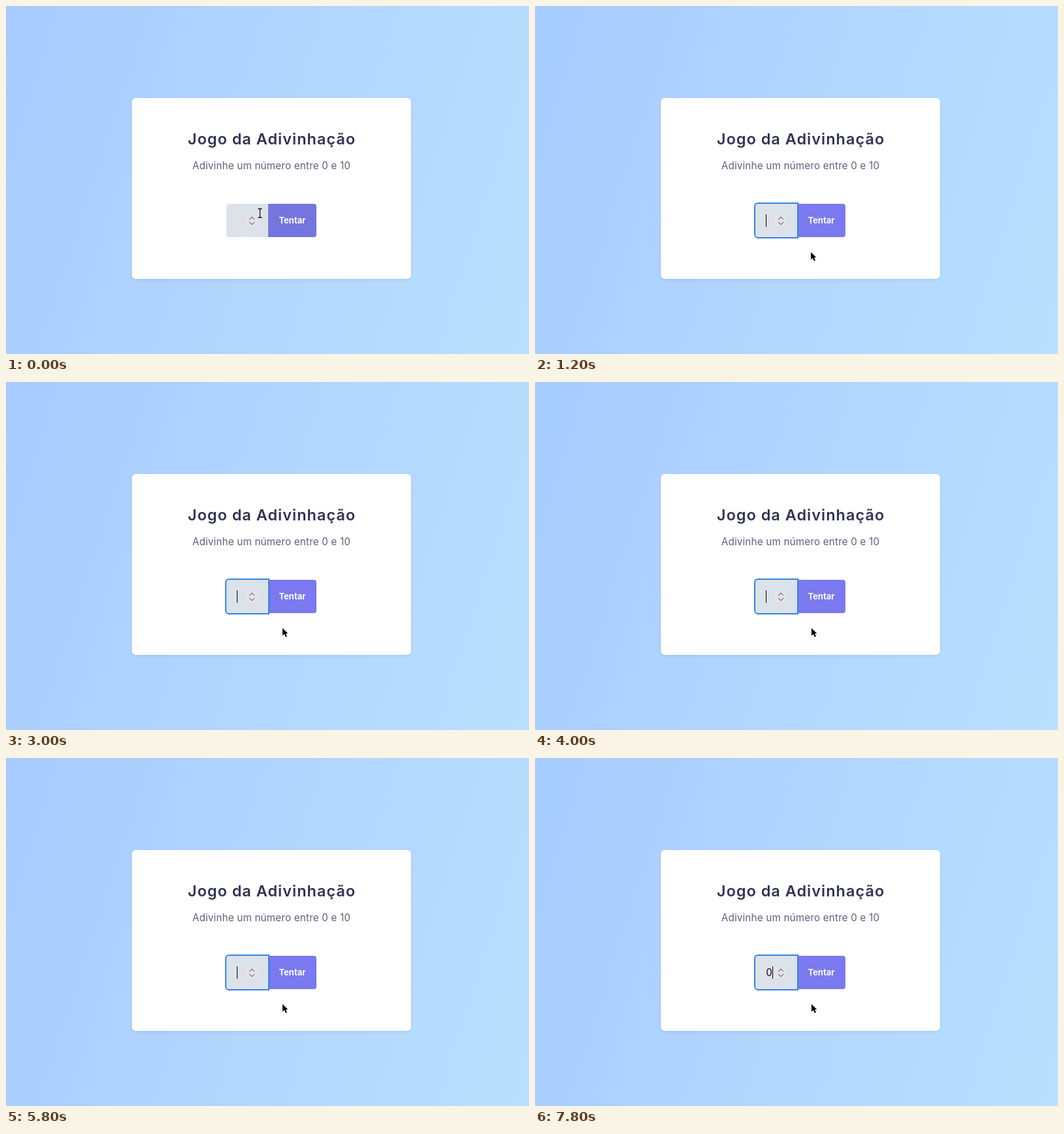
An HTML page that plays this animation: 802 px wide and 533 px high, repeating every 8 s.

```html
<!DOCTYPE html>
<html lang="pt-BR">
<head>
<meta charset="utf-8">
<title>Jogo da Adivinhação</title>
<style>
  html, body { margin: 0; width: 100%; height: 100%; overflow: hidden; }
  body { background: linear-gradient(108deg, #a7ccff, #b9e0fd); }
  .card {
    position: absolute; left: 193px; top: 141px; width: 428px; height: 277px;
    background: #fff; border-radius: 6px; box-shadow: 0 2px 4px rgba(0, 0, 0, .08);
  }
  svg { position: absolute; left: 0; top: 0; display: block; }
  text { font-family: Inter, "Open Sans", sans-serif; text-anchor: middle; }
  .title { font-size: 23.5px; font-weight: 600; letter-spacing: 1px; fill: #2f3353; }
  .hint { font-size: 15.2px; letter-spacing: .2px; fill: #5b5e7b; }
  .label { font-size: 13px; font-weight: 700; fill: #fff; }
  .value { font-size: 15.2px; letter-spacing: -.3px; fill: #0b0b10; }
  .chevron { fill: none; stroke: #85858a; stroke-width: 1.4; }
</style>
</head>
<body>
<div class="card"></div>
<svg width="802" height="533" viewBox="0 0 802 533">
  <text class="title" x="407.5" y="212">Jogo da Adivinhação</text>
  <text class="hint" x="407" y="250">Adivinhe um número entre 0 e 10</text>

  <path id="button" d="M402 303H472a4 4 0 0 1 4 4V350a4 4 0 0 1-4 4H402Z"/>
  <text class="label" x="439" y="333">Tentar</text>
  <path d="M402 303V354H342a4 4 0 0 1-4-4V307a4 4 0 0 1 4-4Z" fill="#dbe2ea"/>
  <path id="ring" d="M403 302V355H342a5 5 0 0 1-5-5V307a5 5 0 0 1 5-5Z"
        fill="none" stroke="#3584e4" stroke-width="2"/>

  <rect id="up" x="368" y="320" width="18" height="9"/>
  <rect id="down" x="368" y="329" width="18" height="9"/>
  <path class="chevron" d="M373 327l4-3.8 4 3.8M373 331l4 3.8 4-3.8"/>

  <text id="value" class="value" y="333.5"></text>
  <rect id="caret" y="319" width="1" height="19" fill="#000"/>

  <g id="arrow">
    <path d="M0 0V11.5L2.8 9 4.8 13.6 6.9 12.7 5 8.3H8.4Z" fill="#000"
          stroke="#fff" stroke-width="1" paint-order="stroke"/>
  </g>
  <g id="beam" fill="none">
    <path d="M-3-6.5H-1L0-5.5 1-6.5H3M0-5.5V6M-3 7H-1L0 6 1 7H3" stroke="#fff" stroke-width="2.6"/>
    <path d="M-3-6.5H-1L0-5.5 1-6.5H3M0-5.5V6M-3 7H-1L0 6 1 7H3" stroke="#000" stroke-width="1.3"/>
  </g>
</svg>
<script>
  const LOOP = 8000, FOCUS = 900;
  const $ = id => document.getElementById(id);
  const show = (id, on) => $(id).setAttribute('visibility', on ? 'visible' : 'hidden');

  // time, x, y, shape
  const pointer = [
    [0, 390, 317, 'beam'], [100, 386, 318, 'beam'], [200, 380, 320, 'arrow'],
    [300, 375, 321, 'arrow'], [400, 372, 322, 'arrow'], [900, 372, 325, 'arrow'],
    [1000, 372, 330, 'arrow'], [1100, 373, 331, 'arrow'],
    [1200, 423, 377, 'arrow'], [1300, 424, 377, 'arrow']
  ];

  // time, typed text, caret x
  const typing = [
    [0, '', 354],
    [1600, '1', 358], [1800, '', 354],
    [2200, '2', 362], [2400, '', 354],
    [2700, '3', 362], [3000, '', 354],
    [3300, '4', 362], [3500, '', 354],
    [3800, '5', 362], [4000, '', 354],
    [4400, '6', 363], [4600, '', 354],
    [4900, '7', 361], [5100, '', 354],
    [5400, '8', 362], [5800, '', 354],
    [6300, '9', 363], [6500, '', 354],
    [6900, '1', 358], [7000, '10', 367], [7200, '', 354],
    [7800, '0', 364]
  ];

  const at = (steps, t) => steps.filter(s => s[0] <= t).pop();

  function draw(t) {
    const [, x, y, shape] = at(pointer, t);
    for (const id of ['arrow', 'beam']) show(id, id === shape);
    $(shape).setAttribute('transform', `translate(${shape === 'beam' ? x - .5 : x} ${y})`);

    const over = (top, bottom) =>
      shape === 'arrow' && x >= 368 && x < 386 && y >= top && y < bottom;
    $('up').setAttribute('fill', over(320, 329) ? '#cdcad2' : '#e5e4e8');
    $('down').setAttribute('fill', over(329, 338) ? '#cdcad2' : '#e5e4e8');

    // button fades back from its hover colour
    const fade = Math.min(1, Math.floor(t / 100) / 2);
    $('button').setAttribute('fill', `rgb(${117 + 5 * fade},${117 + 4 * fade},${224 + 16 * fade})`);

    const [, text, caretX] = at(typing, t);
    $('value').textContent = text;
    $('value').setAttribute('x', (354 + caretX) / 2);
    $('caret').setAttribute('x', caretX);
    show('ring', t >= FOCUS);
    show('caret', t >= FOCUS);
  }

  const start = performance.now();
  function tick() {
    draw((performance.now() - start) % LOOP);
    requestAnimationFrame(tick);
  }
  tick();
</script>
</body>
</html>
```
